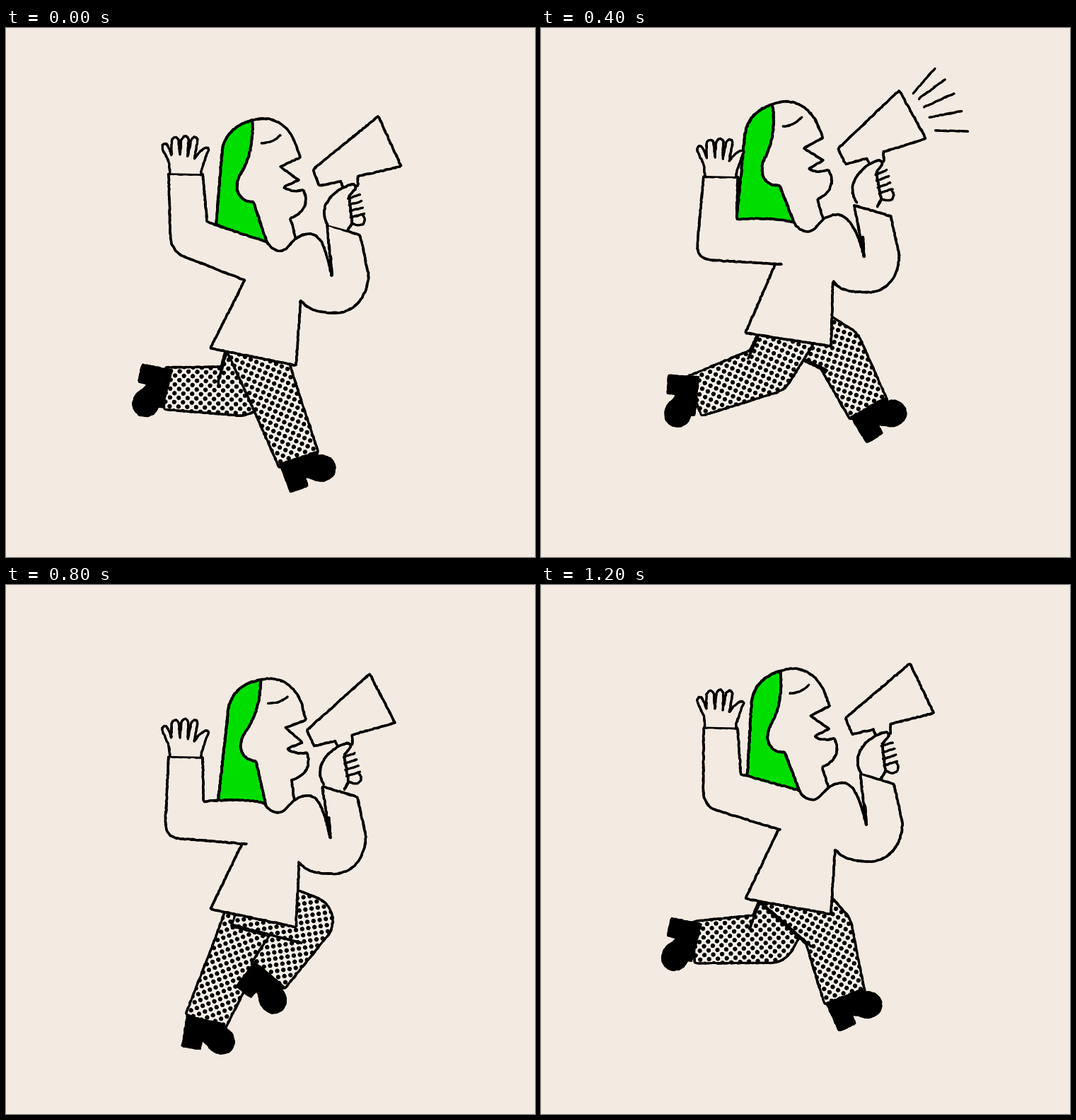
An HTML page with a canvas for the animation above (1.28 s loop, 748 by 748 pixels).

```html
<!DOCTYPE html>
<html lang="en">
<head>
<meta charset="utf-8">
<title>Runner with megaphone</title>
<style>
html, body { margin: 0; width: 100%; height: 100%; overflow: hidden; background: #f3ebe1; }
canvas { display: block; width: 100vw; height: 100vh; }
</style>
</head>
<body>
<canvas id="stage" width="748" height="748"></canvas>
<script>
const PAPER = '#f3ebe1', INK = '#000', GREEN = '#00de00';
const STEP = 80, COUNT = 16, TURN = 2 * Math.PI, RAD = Math.PI / 180;
const ctx = document.getElementById('stage').getContext('2d');
const probe = document.createElementNS('http://www.w3.org/2000/svg', 'path');
ctx.lineJoin = ctx.lineCap = 'round';

// Key poses of one stride: phase, thigh, shin (degrees forward of straight down), foot.
const stride = [
  [0, 21, 21, -18], [2, -24, -24, 12], [3, -33, -33, 23], [4, -48, -48, 65],
  [5, -28, -70, 96], [7, -24, -94, 108], [8, -1, -84, 90], [10, 72, -36, 40],
  [12, 66, 15, -23], [13, 61, 27, -29], [15, 45, 14, -22], [16, 21, 21, -18]
];

function strideAt(phase) {
  const p = (phase + COUNT) % COUNT, n = stride.findIndex(k => k[0] > p);
  const a = stride[n - 1], b = stride[n], t = (p - a[0]) / (b[0] - a[0]);
  return a.map((v, k) => v + (b[k] - v) * t);
}

// Two harmonics over one step of the run; a loop holds two steps.
function wave(i, mean, c1, s1, c2, s2) {
  const a = TURN * i / 8;
  return mean + c1 * Math.cos(a) + s1 * Math.sin(a) + c2 * Math.cos(2 * a) + s2 * Math.sin(2 * a);
}

function bodyAt(i) {
  const lift = wave(i, -7.5, 8.5, 15.2, 0, -1.8);
  const lean = wave(i, -2.75, 1.75, .4, .65, -.4);
  const nod = wave(i, -.2, .6, 4.1, -.3, -.5);
  return {
    lift, lean, nod,
    cuff: wave(i, 219.4, -9.1, 19.3, -4, -2.2),
    hair: wave(i, 288.5, -2.8, 10.7, -.7, -6.7) + 12 * Math.cos(TURN * i / COUNT) ** 9,
    kx: 369 + .6 * nod + 1.9 * lean, ky: 301 + lift
  };
}

let seed = 1;
function rand() {
  seed = (seed * 16807) % 2147483647;
  return seed / 2147483647 - .5;
}

// Resample a path with a little jitter, like an inked edge.
function rough(d) {
  probe.setAttribute('d', d);
  const len = probe.getTotalLength(), n = Math.max(2, Math.round(len / 3));
  const p = new Path2D();
  for (let k = 0; k <= n; k++) {
    const q = probe.getPointAtLength(len * k / n);
    p.lineTo(q.x + rand() * 1.3, q.y + rand() * 1.3);
  }
  return p;
}

function ink(d, fill, width = 3.3) {
  if (fill) {
    ctx.fillStyle = fill;
    ctx.fill(new Path2D(d));
  }
  ctx.strokeStyle = INK;
  ctx.lineWidth = width;
  ctx.stroke(rough(d));
  ctx.stroke(rough(d));
}

// Carries the point (px, py) to (x, y) and turns everything around it.
function mover(px, py, x, y, deg) {
  const c = Math.cos(deg * RAD), s = Math.sin(deg * RAD);
  return (u, v) => [x + (u - px) * c - (v - py) * s, y + (u - px) * s + (v - py) * c];
}

function shift(d, move) {
  return d.replace(/(-?[\d.]+) (-?[\d.]+)/g, (_, u, v) => move(+u, +v).map(n => n.toFixed(2)).join(' '));
}

const tile = document.createElement('canvas');
tile.width = tile.height = 18;
const tc = tile.getContext('2d');
tc.fillStyle = '#f6f0e8';
tc.fillRect(0, 0, 18, 18);
tc.fillStyle = INK;
tc.arc(9, 9, 6.5, 0, TURN);
tc.fill();
const dots = ctx.createPattern(tile, 'repeat');

function quad(ax, ay, bx, by, wa, wb) {
  const l = Math.hypot(bx - ax, by - ay), nx = (ay - by) / l, ny = (bx - ax) / l;
  const side = s => [[ax + nx * s * wa, ay + ny * s * wa], [bx + nx * s * wb, by + ny * s * wb]];
  const a = side(1), b = side(-1);
  return { a, b, d: `M${a[0]}L${a[1]}L${b[1]}L${b[0]}Z` };
}

const SHOE = 'M-27 -2L-25 41L0.6 40L0.8 27Q7 29 12 34C23 45 45 41 46 24C46 12 38 5 28 4L27 -2Z';

function drawLeg(phase, lift) {
  const [p, thighDeg, shinDeg, foot] = strideAt(phase);
  const ux = Math.sin(thighDeg * RAD), uy = Math.cos(thighDeg * RAD), reach = Math.max(0, ux);
  const hx = 352, hy = 452 + lift - 10 * reach;
  const kx = hx + ux * (64 + 16 * reach), ky = hy + uy * (64 + 16 * reach);
  const len = 102 + 9 * Math.sin(TURN * p / COUNT);
  const ax = kx + len * Math.sin(shinDeg * RAD), ay = ky + len * Math.cos(shinDeg * RAD);

  const thigh = quad(hx - ux * 20, hy - uy * 20, kx, ky, 39, 33);
  const shin = quad(kx, ky, ax, ay, 33, 28);
  const knee = `M${kx - 33} ${ky}a33 33 0 1 1 66 0a33 33 0 1 1 -66 0Z`;
  const parts = [thigh.d, shin.d, knee];
  parts.forEach(d => ink(d, null, 6.6));

  dots.setTransform(new DOMMatrix().translate(ax, ay).rotate(45 - shinDeg).scale(.49));
  ctx.fillStyle = dots;
  parts.forEach(d => ctx.fill(new Path2D(d)));

  const bend = thighDeg - shinDeg;
  if (Math.abs(bend) > 27) {
    const [from, to] = bend > 0 ? thigh.a : thigh.b;
    ink(`M${from}L${to}`);
  }
  ink(shift(SHOE, mover(0, 0, ax, ay, foot)), INK, 2);
}

function drawHead({ lift, lean, nod, hair, cuff, kx, ky }) {
  const move = mover(401, 269, 402 + 1.3 * (nod + lean), 268 + lift, nod);
  const put = d => shift(d, move);
  if (hair > 303) {
    ink(`M${kx + 36} ${ky - 32}L${kx + 51} ${ky - 43}L${kx + 50} ${ky - 6}L${kx + 44} ${ky - 4}Z`, GREEN);
  }
  ink(put('M347 131C350 165 341 190 331 206C322 222 323 245 349 246')
    + `L${kx + 2} ${ky + 5}L${hair} ${cuff + 72 + 1.7 * lean}L`
    + put('305 172C309 152 322 137 347 131') + 'Z', GREEN, 3.6);
  ink(put('M347 131C380 120 402 143 409 165L415 183L387 196L413 215L392 225Q402 233 420 229'
    + 'C428 248 420 262 401 269') + `L${kx + 42} ${ky - 3}`);
  ink(put('M360 163Q376 163 387 152'), null, 3);
}

function drawTorso({ lift, lean, cuff, kx, ky }) {
  const ax = 417 + .9 * lean, ay = 384 + lift;
  const K = (x, y) => `${kx + x} ${ky + y} `, A = (x, y) => `${ax + x} ${ay + y} `;
  const ex = 234 + 3.2 * lean, ey = cuff + 109 - 1.7 * lean;
  const tx = 338 + 1.4 * lean, cx = tx - 2 * lean, cy = 355.5 + lift - lean;
  const sleeve = t => `${ex + (cx - ex) * t} ${ey + (cy - ey) * t} `;
  const bulge = .5 * lean, rise = 24 / (ey - cuff);
  ink(`M278 ${cuff + 1}L${285 + 1.8 * lean} ${cuff + 68.5 + 1.7 * lean}Q${K(-28, -8)}${K(0, 0)}`
    + `Q${K(7, 13)}${K(20, 13)}C${K(34, 12)}${K(36, -11)}${K(62, -11)}`
    + `C${K(80, -9)}${A(36, -66)}${A(44, -35)}`
    + `L${A(38 + lean * 1.7, -107)}L${A(84 + bulge, -92)}L${A(96 + bulge, -37)}`
    + `C${A(96 + bulge, -7)}${A(76, 18 + bulge)}${A(50, 18 + bulge)}C${A(32, 18 + bulge)}${A(12, 16)}${A(0, 0)}`
    + `L410 ${476 + lift}L289 ${452 + .8 * lift}L${sleeve((tx - ex) / (cx - ex))}L${sleeve(1)}`
    + `L${sleeve(.18)}Q${sleeve(0)}${ex + (230 - ex) * rise} ${ey - 24}L230 ${cuff}Z`, PAPER);
  ink(`M${A(42, -62)}L${A(44, -35)}`, null, 4);
}

function drawWave({ cuff }) {
  ink(shift('M232 204L230 188L221 169Q220 161 226 162Q230 165 234 179L234 158Q238 149 244 156'
    + 'L246 178L248 156Q254 147 258 156L257 180L262 156Q268 149 271 157L266 184'
    + 'Q274 171 283 168Q289 168 285 174L276 200L276 205', mover(0, 205, 0, cuff, 0)), PAPER, 3);
}

// Returns the middle of the horn's mouth.
function drawHorn({ lift, lean }) {
  const move = mover(492, 186, 492 + 3.5 * lean, 185.5 + lift + 1.6 * lean, lean);
  const put = (d, fill, w) => ink(shift(d, move), fill, w);
  put('M474 217L444 223L435 200L528 125L560 196L498 210L499 223L478 226Z', PAPER);
  put('M455 278C446 262 452 246 463 236C472 227 483 223 491 221C497 222 497 228 492 231'
    + 'L486 238L490 276L484 286', PAPER, 3.4);
  for (let k = 0; k < 4; k++) {
    put(`M${485 + k} ${241 + k * 9}L${501 + k * 2} ${236 + k * 9}`, null, 3);
  }
  put('M484 285L491 276Q503 283 508 274Q509 269 505 264', null, 3);
  return move(544, 160.5);
}

function drawRays(i, [x, y]) {
  const from = Math.max(0, 12 * (i - 5)), to = Math.min(47, 11.5 * (i - 1));
  if (to <= from) return;
  for (let k = 0; k < 5; k++) {
    const deg = 12.5 * k - 49, c = Math.cos(deg * RAD), s = Math.sin(deg * RAD);
    const rx = x + 1 + 7.7 * k, ry = y - 30 + 6 * k + 1.8 * k * k;
    ink(`M${rx + c * from} ${ry + s * from}L${rx + c * to} ${ry + s * to}`, null, 3);
  }
}

function draw(i) {
  seed = 9173 + i * 7919;
  ctx.fillStyle = PAPER;
  ctx.fillRect(0, 0, 748, 748);
  const body = bodyAt(i);
  const drag = .8 * Math.cos(Math.PI * i / COUNT) ** 16; // the far leg hangs back at its highest kick
  drawLeg(i + 8 - drag, body.lift);
  drawLeg(i, body.lift);
  drawHead(body);
  drawTorso(body);
  drawWave(body);
  drawRays(i, drawHorn(body));
}

let shown = -1;
function tick() {
  const i = Math.floor(performance.now() / STEP) % COUNT;
  if (i !== shown) draw(shown = i);
  requestAnimationFrame(tick);
}
tick();
</script>
</body>
</html>
```
